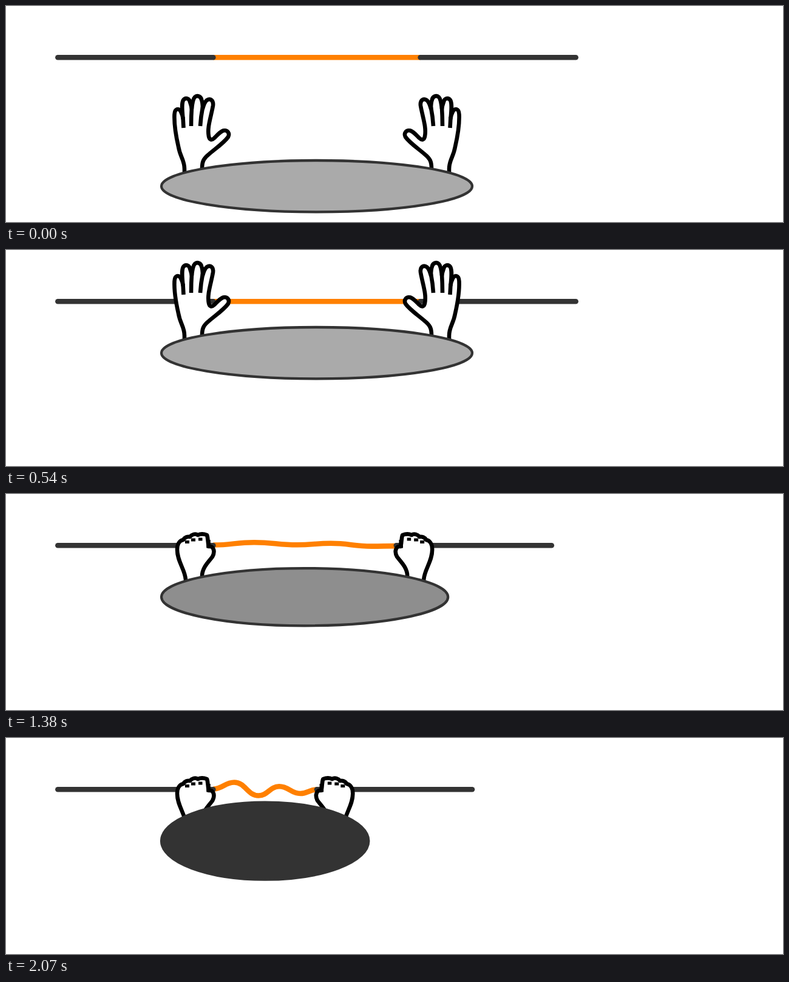
Recreate the animation shown at these times as an HTML page. Size 1280 px wide and 358 px high, loop 2970 ms.

```html
<!DOCTYPE html>
<html lang="en">
<head>
<meta charset="utf-8">
<title>Pushing a rope</title>
<style>
  html, body { margin: 0; width: 100%; height: 100%; overflow: hidden; background: #fff; }
  svg { display: block; }
  .line { fill: none; stroke-width: 8.53; }
  .bar { stroke: #333; stroke-linecap: round; }
  .hand { fill: #fff; stroke: #000; stroke-width: 6.6; stroke-linejoin: round; }
  .crease { fill: none; }
  .dash { fill: none; stroke-width: 5; }
</style>
</head>
<body>
<svg width="1280" height="358" viewBox="0 0 1280 358">
  <defs>
    <g id="open" class="hand">
      <path d="M294 158V142C294 127 287 123 284 105C279 83 277 64 277.5 52C278 41 285 41 288 47C290 51 291 54 291.5 58C290 44 289 34 292 28C296 23 302 25 303 31C304 34 305.5 38 306 42C307 33 308 26 311 23C315 19 321 22 322 27C324 32 324 37 324 42C326 35 328 30 331 28C337 24 342 29 341 37C338 55 331 73 334 88C335 94 339 95 343 91C348 86 353 80 358 78.5C365 77 369 83 366 89C359 99 344 109 335 117C325 125 323 130 323 142V158"/>
      <path class="crease" d="M291.5 56Q292 65 292.5 74M306 40Q305 55 305 71M324 40Q321 55 320 71"/>
    </g>
    <g id="fist" class="hand">
      <path d="M296 158V142C295 125 282 112 282 92C282 83 286 77 292 76C294 72 299 70 303 71C306 67 312 65 316 68C320 66 326 66 331 68C333 73 332 79 334 87L338 87C343 90 344 97 340 104C334 112 323 122 323 136V158"/>
      <path class="crease" d="M333.5 76V89.5"/>
      <path class="dash" d="M295 79.5h7M305 76h7M317 75h6.5"/>
    </g>
  </defs>
  <path id="rope" class="line" stroke="#ff8000"/>
  <path class="line bar" d="M85.33 85.33H341.33"/>
  <path id="rightBar" class="line bar" d="M682.67 85.33H938.67"/>
  <use id="leftHand"/>
  <use id="rightHand"/>
  <ellipse id="body" stroke="#333" stroke-width="4.27"/>
</svg>
<script>
const LOOP = 2970, STEP = 30, UNIT = 128 / 3;
const $ = id => document.getElementById(id);
const set = (id, attrs) => {
  for (const key in attrs) $(id).setAttribute(key, attrs[key]);
};
const mix = (a, b, k) => a + (b - a) * k;

// Stepped linear progress, 0 to 1
const progress = (t, start, steps) =>
  Math.max(0, Math.min(steps, Math.floor((t - start) / STEP))) / steps;

// Rope extremes: x, y when barely squeezed, then x, y when fully squeezed
const bends = [
  [341.3, 84.6, 341.3, 84.6],
  [419, 82.2, 376, 73.5],
  [499, 80.8, 416, 95.5],
  [561, 82.3, 450, 80.3],
  [638, 85, 485, 92],
  [682.7, 86.3, 512, 85.5]
];

function ropePath(k) {
  if (!k) return 'M341.33 85.33H682.67';
  const points = bends.map(([x0, y0, x1, y1]) => [mix(x0, x1, k), mix(y0, y1, k)]);
  return points.reduce((d, [x, y], i) => {
    if (!i) return `M${x} ${y}`;
    const [px, py] = points[i - 1], reach = (x - px) * 0.45;
    return `${d}C${px + reach} ${py} ${x - reach} ${y} ${x} ${y}`;
  }, '');
}

function draw() {
  const t = performance.now() % LOOP;
  const drop = 128 * (1 - progress(t, 270, 9));
  const squeeze = progress(t, 1170, 30);
  const shift = 4 * UNIT * squeeze;
  const gray = Math.round(mix(170, 51, squeeze));
  const href = t < 870 ? '#open' : '#fist';

  set('rope', { d: ropePath(squeeze) });
  set('rightBar', { transform: `translate(${-shift} 0)` });
  set('leftHand', { href, transform: `translate(0 ${drop})` });
  set('rightHand', { href, transform: `translate(${1024 - shift} ${drop}) scale(-1 1)` });
  set('body', {
    cx: 512 - shift / 2,
    cy: 4 * UNIT + drop,
    rx: 256 - shift / 2,
    ry: mix(UNIT, 64, squeeze),
    fill: `rgb(${gray},${gray},${gray})`
  });
  requestAnimationFrame(draw);
}
draw();
</script>
</body>
</html>
```
